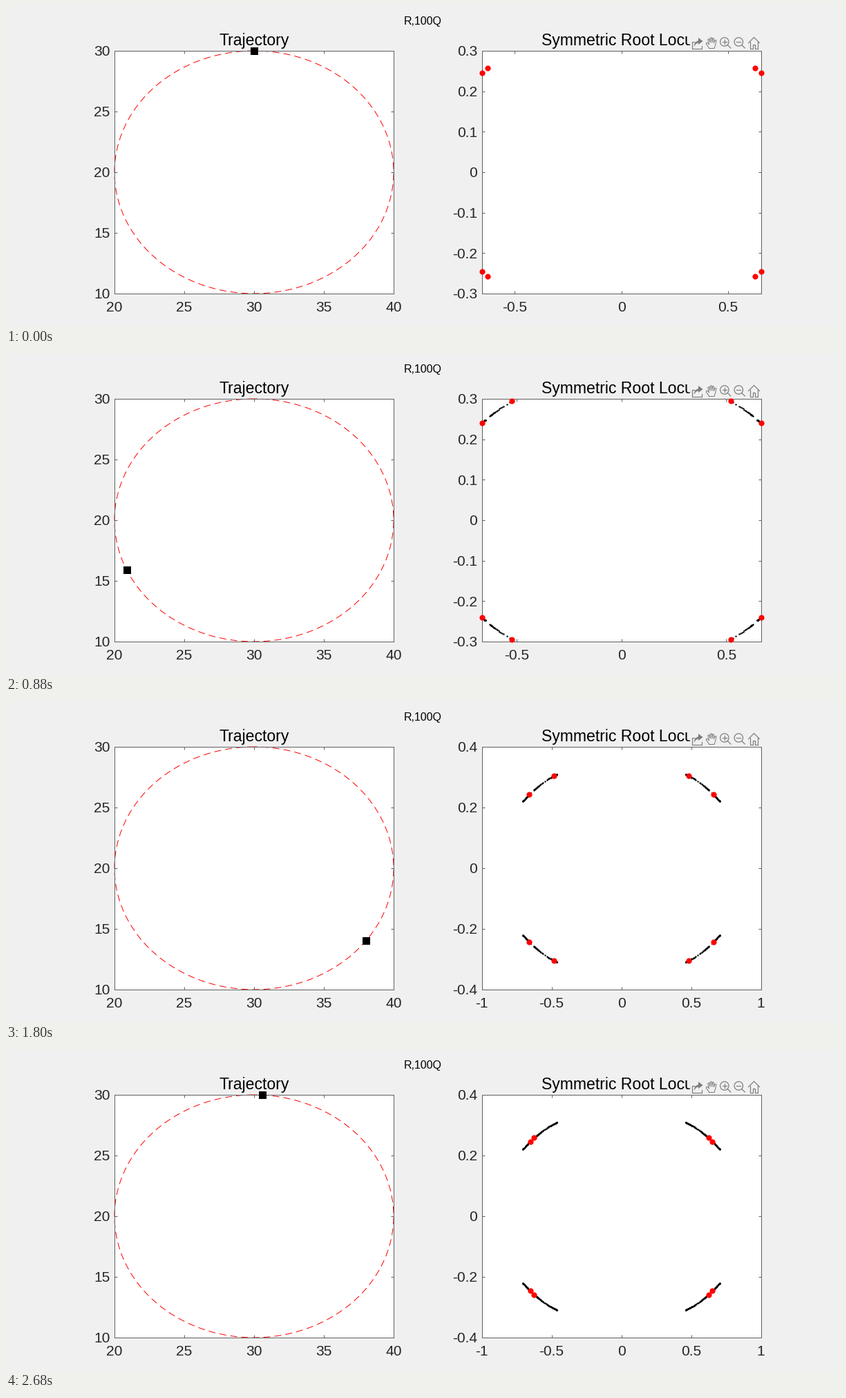
A matplotlib script that plays this animation: 1207x464 px, repeating every 2720 ms.

```python
import numpy as np
import matplotlib.pyplot as plt
from matplotlib.animation import FuncAnimation
from matplotlib.patches import Circle, Polygon, Rectangle

W, H, DPI = 1207, 464, 64
FRAMES, INTERVAL = 68, 40
PX = 72 / DPI
BG, INK, EDGE, ICON = "#f0f0f0", "#262626", "#606060", "#7c7c7c"
plt.rcParams["font.family"] = "Liberation Sans"


def smooth(x, keys, vals):
    """Cubic Hermite curve through a few points."""
    keys, vals = np.asarray(keys, float), np.asarray(vals, float)
    slope = np.gradient(vals, keys)
    i = np.clip(np.searchsorted(keys, x, side="right") - 1, 0, len(keys) - 2)
    h = keys[i + 1] - keys[i]
    u = (x - keys[i]) / h
    return ((1 + 2 * u) * (1 - u) ** 2 * vals[i] + u * (1 - u) ** 2 * h * slope[i]
            + u * u * (3 - 2 * u) * vals[i + 1] + u * u * (u - 1) * h * slope[i + 1])


# Heading around the circle: a steady pace with a short rush every 14 frames or so
angle = np.interp(np.arange(FRAMES),
                  [0, 14, 18, 20, 22, 28, 31, 33, 42, 45, 46, 48, 53, 60, 62, 67],
                  [0, 66.6, 85.6, 104.7, 114.3, 143, 158.5, 176, 218.8, 233.2,
                   238, 257, 280.7, 314, 333, 356.7])

# Real parts of the inner and outer roots as functions of heading
inner = smooth(angle,
               [0, 47.9, 66.5, 114.3, 138, 158.5, 190, 207, 218.8, 233.2, 280.7, 295, 360],
               [.626, .6036, .586, .5206, .4965, .485, .466, .4605, .465, .4827,
                .564, .586, .627])
outer = smooth(angle,
               [0, 47.9, 114.3, 158.5, 178, 190, 218.8, 233.2, 280.7, 360],
               [.6536, .6489, .6655, .698, .7035, .702, .678, .661, .6485, .6536])


def imag(x):
    return .309 - .2946 * (x - .46) - .6487 * (x - .46) * (x - .6036)


def mirror(x):
    """All four sign combinations of the roots."""
    y = imag(x)
    return np.concatenate([x, -x, x, -x]), np.concatenate([y, y, -y, -y])


fig = plt.figure(figsize=(W / DPI, H / DPI), dpi=DPI, facecolor=BG)


def panel(left, title):
    ax = fig.add_axes([left / W, 1 - 417 / H, 404 / W, 352 / H])
    ax.tick_params(direction="in", top=True, right=True, length=4 * PX, width=PX,
                   color=EDGE, labelcolor=INK, labelsize=21 * PX)
    ax.tick_params(axis="x", pad=11 * PX)
    ax.tick_params(axis="y", pad=6.5 * PX)
    for s in ax.spines.values():
        s.set(linewidth=PX, color=EDGE)
    fig.text((left + 202) / W, 1 - 57 / H, title, size=23 * PX, ha="center",
             va="baseline", color="black")
    return ax


def set_ticks(ax, xs, ys):
    ax.set_xticks(xs, [f"{v:g}" for v in xs])
    ax.set_yticks(ys, [f"{v:g}" for v in ys])


fig.text(603.5 / W, 1 - 26.5 / H, "R,100Q", size=16 * PX, ha="center",
         va="baseline", color="black")

track = panel(157, "Trajectory")
track.set(xlim=(20, 40), ylim=(10, 30))
set_ticks(track, range(20, 41, 5), range(10, 31, 5))
a = np.linspace(0, 2 * np.pi, 400)
track.plot(30 - 10 * np.sin(a), 20 + 10 * np.cos(a), color="red", lw=PX,
           ls=(0, (10, 6)), dash_capstyle="butt", clip_on=False)
cart, = track.plot([], [], "s", color="black", ms=11 * PX, mew=0,
                   clip_on=False, zorder=5)

roots = panel(688.5, "Symmetric Root Locus")
trail, = roots.plot([], [], "o", color="black", ms=2.4 * PX, mew=0)
dots, = roots.plot([], [], "o", color="red", ms=8.2 * PX, mew=0,
                   clip_on=False, zorder=5)

# Toolbar over the end of the right title
bar = fig.add_axes([0, 0, 1, 1], zorder=10)
bar.set(xlim=(0, W), ylim=(H, 0))
bar.axis("off")
bar.add_patch(Rectangle((990, 42), 104, 21, color=BG, lw=0))


def stroke(*pts, width=1.2):
    bar.plot(*zip(*pts), color=ICON, lw=width * PX, solid_joinstyle="round")


stroke((996, 52), (992.5, 52), (992.5, 61.5), (1006.5, 61.5), (1006.5, 57.5))
bar.add_patch(Polygon([(995.5, 59), (997, 53), (1002, 50), (1002, 46), (1008.5, 51),
                       (1002, 56), (1002, 53.2), (998.5, 55)], color=ICON, lw=0))
stroke((1018, 61.5), (1013.5, 55.5), (1013.5, 53.5), (1015.5, 53.5), (1017.5, 56),
       (1015.8, 48.5), (1017.5, 47.5), (1019.3, 53), (1019.3, 46), (1021.3, 46),
       (1021.7, 53), (1022.7, 46.8), (1024.5, 47), (1024.3, 53.5), (1026.3, 49.3),
       (1028, 50), (1026.5, 57), (1025, 61.5), (1018, 61.5), width=1)
for cx in (1039.8, 1060.3):
    bar.add_patch(Circle((cx, 52), 6.2, fill=False, ec=ICON, lw=1.2 * PX))
    stroke((cx - 3, 52), (cx + 3, 52))
    stroke((cx + 4.5, 56.5), (cx + 9, 61))
stroke((1039.8, 49), (1039.8, 55))
stroke((1074.5, 53.5), (1082.5, 45.5), (1090.5, 53.5))
stroke((1077, 52), (1077, 61.5), (1080.7, 61.5), (1080.7, 56), (1084.3, 56),
       (1084.3, 61.5), (1088, 61.5), (1088, 52))


def update(k):
    t = np.radians(angle[k])
    cart.set_data([30 - 10 * np.sin(t)], [20 + 10 * np.cos(t)])

    trail.set_data(*mirror(np.concatenate([inner[:k], outer[:k]])))
    dots.set_data(*mirror(np.array([inner[k], outer[k]])))

    # Tight x limits until the data fills two thirds of the unit range
    reach = outer[:k + 1].max()
    wide = reach > .667
    tall = imag(inner[:k + 1].min()) > .3
    xmax = 1 if wide else reach
    ymax = .4 if tall else .3
    set_ticks(roots, [-1, -.5, 0, .5, 1] if wide else [-.5, 0, .5],
              [-.4, -.2, 0, .2, .4] if tall else [-.3, -.2, -.1, 0, .1, .2, .3])
    roots.set(xlim=(-xmax, xmax), ylim=(-ymax, ymax))
    return cart, trail, dots


anim = FuncAnimation(fig, update, frames=FRAMES, interval=INTERVAL,
                     repeat=True, repeat_delay=0, blit=False)
plt.show()
```
